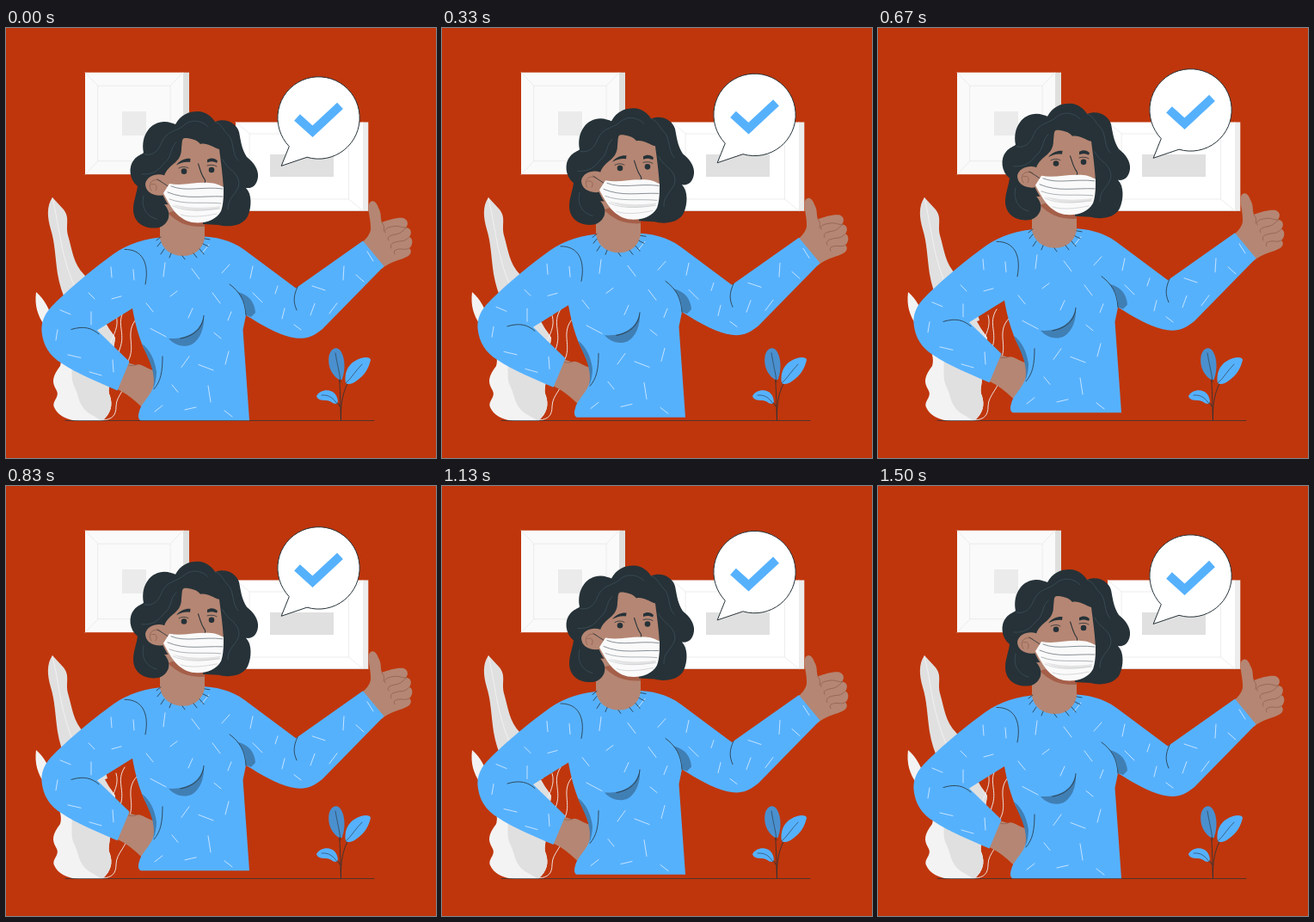
An HTML page with a canvas for the animation above (1540 ms loop, 500 px wide and 500 px high).

```html
<!DOCTYPE html>
<html lang="en">
<head>
<meta charset="utf-8">
<title>Thumbs up</title>
<style>
  html, body { margin: 0; width: 100%; height: 100%; overflow: hidden; background: #bf360c; }
  canvas { display: block; }
</style>
</head>
<body>
<canvas id="stage" width="500" height="500"></canvas>
<script>
const ctx = document.getElementById('stage').getContext('2d');
const LOOP = 1540, STEPS = 37, LIFT = 9.3, PEAK = 730;
const INK = '#263238', BLUE = '#56b1fd', SHADE = '#407fb4';
const SKIN = '#b58673', SKIN_LINE = '#8a5c4b';

const fill = (color, d) => {
  ctx.fillStyle = color;
  ctx.fill(new Path2D(d));
};
const line = (color, d, width = 1) => {
  ctx.strokeStyle = color;
  ctx.lineWidth = width;
  ctx.stroke(new Path2D(d));
};
const rect = (color, x, y, w, h) => {
  ctx.fillStyle = color;
  ctx.fillRect(x, y, w, h);
};
const dot = (color, x, y, r) => {
  ctx.fillStyle = color;
  ctx.beginPath();
  ctx.arc(x, y, r, 0, Math.PI * 2);
  ctx.fill();
};

function pictureFrame(x, y, w, h, insetX, insetY, face, side, depth) {
  rect(side, x + w, y, depth, h);
  rect(face, x, y, w, h);
  const l = x + insetX, t = y + insetY, r = x + w - insetX, b = y + h - insetY;
  line('#e6e6e6', `M${l} ${t}H${r}V${b}H${l}Z M${x} ${y}L${l} ${t}M${x + w} ${y}L${r} ${t}
    M${x} ${y + h}L${l} ${b}M${x + w} ${y + h}L${r} ${b}`, 0.7);
}

function drawRoom() {
  rect('#bf360c', 0, 0, 500, 500);
  pictureFrame(92, 51.7, 114, 118.5, 15, 15.5, '#fafafa', '#dfdfdd', 7);
  rect('#ebebeb', 135, 97, 28, 28);
  pictureFrame(267, 109.5, 148, 103, 16.5, 13.5, '#ffffff', '#ededed', 6.3);
  rect('#e0e0e0', 307, 147, 74, 26);
  line('#dcdcdc', 'M267 212.5H421', 0.8);
}

function drawPaleLeaves() {
  fill('#e0e0e0', `M54 197C47 207 48 220 52 234C57 250 57 266 60 286C64 310 74 330 90 350
    L118 340C112 318 103 300 91 287C78 274 77 258 72 241C69 228 75 220 66 210Z`);
  line('#f5f5f5', 'M54 198C60 222 63 250 69 270C74 290 82 307 94 326', 0.8);
  fill('#f3f3f3', `M35 307C33 323 37 334 44 345C53 361 68 378 63 393C54 405 53 411 58 420
    C64 429 53 433 56 441C60 450 70 456 84 457H112C123 447 124 438 121 428
    C117 420 123 412 120 402L127 360C120 348 112 340 102 346L70 360C52 350 56 325 35 307Z`);
  fill('#e0e0e0', `M76 382C78 398 74 407 80 418C85 428 84 440 98 449L112 457
    C123 447 124 438 121 428C117 420 123 412 120 402L127 362L112 336L92 336Z`);
  line('#f3f3f3', `M128 334C132 347 125 356 121 368M138 327C127 344 140 354 132 374
    C128 386 134 396 129 408M152 338C137 354 152 370 142 387M141 404C143 418 128 426 128 440
    C128 450 124 455 113 456`, 0.9);
}

function drawSprout() {
  line(INK, 'M389.5 456C389 438 391 423 400 408M389.5 456C388 432 390 412 384 386M388 440C386 434 380 430 371 429', 0.8);
  fill('#4a90cf', 'M381 373C374 376 373 392 380 402C384 408 390 411 391 408C395 397 394 384 390 377C388 373 384 371 381 373Z');
  fill(BLUE, 'M395 413C393 402 397 392 406 387C414 382 424 382 424 386C422 395 417 404 408 410C403 414 398 415 395 413Z');
  fill(BLUE, 'M361 428C365 420 378 419 383 426C386 430 387 437 384 437C379 437 378 433 372 433C366 433 362 432 361 428Z');
  line(INK, 'M383 378C385 391 388 400 389 412M395 413C402 407 406 399 414 391M367 427C376 426 381 431 385 437', 0.6);
}

function drawHands() {
  fill(SKIN, `M138 388L151 392C157 389 164 397 174 399L178 423L158 441
    C149 432 139 424 127 419Z`);
  line(SKIN_LINE, 'M151 392C147 393 145 393 142 392', 0.7);
  fill(SKIN, `M411 252C419 245 425 239 424 231C424 220 419 208 423 203C427 199 431 203 433 209
    C437 216 435 220 437 226C445 223 455 220 462 221C468 223 468 229 465 232
    C472 233 472 239 469 243C474 245 473 253 469 256C473 260 470 265 464 267
    C455 271 446 272 437 280Z`);
  line(SKIN_LINE, `M437 226C440 230 440 232 439 236M441 238C439 234 443 232 449 231
    C457 229 461 233 465 232M445 247C442 243 447 241 453 240C460 239 463 234 466 232
    M448 256C445 251 451 249 458 248C464 248 467 245 469 243M452 263C449 258 455 257 460 257
    C465 258 468 257 469 256`, 0.7);
}

function drawSweater() {
  fill(BLUE, `M179 243.5C154 246 136 254 118 268C95 285 69 307 52 325C43 335 41 344 41.5 353
    C43 369 51 382 65 390C83 402 108 412 129.5 421.5L143.5 388L106 351.5L147 326
    C150 343 154 358 160 372C168 386 174 398 173 409C172 426 157 435 155 446
    C153 451 154 456 157 456.3H283L275.5 351L279 334C297 345 315 356 331 359.5
    C346 363 356 360 368 350L439.5 277L415 247.5L337 302.5L284 263
    C267 249 251 244 231 242.5Z`);
  fill(SHADE, 'M158 367C167 374 173 385 175 400C175 408 173 415 171 420C175 401 166 386 160 372Z');
  fill(SHADE, 'M189 361C211 362 226 353 230 334.5C231 350 225 363 216 368C207 372 196 369 189 361Z');
  fill(SHADE, 'M269 307C282 310 289 318 290 331L285 336L279 334C280 324 276 314 269 307Z');
  line(INK, `M138 257.5C158 257 167 273 162 298M76 350.5C91 346 100 349 108 356
    M339 301C334 312 334 319 338 328M182 382C182 400 180 411 172 420
    M230 334.5C229 348 220 358 203 361M260 298C272 307 278 317 279 334`, 0.8);
  line('#eaf5ff', `M122 278L123 290M148 281L149 293M96 308L103 315M123 315L134 312M63 328L75 333
    M99 330V345M60 351L58 363M72 380L87 383.5M97 400L111 404M124 386L125 400M185 273L183 289
    M216 280L225 292M260 275L251 285M287 277L284 291M163 320L171 330M191 312L199 306
    M217 326L212 337M240 308L249 320M168 349.5L186 359M262 330L258 340M242 354.5L250 361
    M259 376L255 391M213 382L204 394.5M224 391.5L241 398M193 415L200 423.5M173 446L182 439
    M208 444L221 441M235 416L238 435M254 445L263 452M287 308L298 319M316 300L313 309
    M324 326L321 338M335 345L343 351M359 320.5L354 334M385 320L376 332M356 300L371 305
    M393 277L392 293M407 287L416 295M420 260L427 271M236 252L228 262`, 0.75);
}

function drawNeck() {
  fill(SKIN, 'M179 205H231V245C228 257 220 265 206 265C191 265 182 257 179 245Z');
  fill('#a55f49', 'M188 215C199 226 211 232 231 231V221L205 210Z');
  line(INK, `M180 243L175 247M180 249L176 254M184 257L180 263M192 262L190 267
    M205 265L208 269M218 262L222 267M225 257L230 263M229 251L235 254M231 245L237 246`, 0.8);
}

function drawHead() {
  fill(INK, `M184 205C194 216 189 228 178 232C161 235 148 226 148 211C148 201 152 193 153 184
    C143 176 142 161 149 153C153 148 158 147 160 145C156 124 169 109 184 109C190 109 194 111 197 112
    C203 101 212 97 223 97C233 97 240 104 243 109C256 104 268 111 271 121
    C273 131 274 141 280 150C288 156 294 165 293 173C292 182 287 187 279 186
    C286 193 286 208 281 219C275 231 257 232 247 229L229 228L231 207Z`);
  fill(SKIN, `M184 172C189 157 204 158 204 140C205 133 204 128 208 128C215 128 222 130 226 135
    C233 133 241 139 248 141C250 157 252 170 253 188C253 210 245 223 223 226
    C202 224 189 210 182 193Z`);
  fill(SKIN, 'M189 174C181 167 164 170 162 181C162 191 172 197 186 194Z');
  line(SKIN_LINE, 'M180 178C170 173 164 182 169 189M169 182C174 180 177 184 174 189', 0.7);
  line('#465a64', `M161 147C170 149 177 144 181 133C187 119 198 121 207 113C216 105 229 108 235 115
    M158 170C171 171 178 165 184 157C193 151 190 140 198 133
    M243 109C252 112 252 119 258 124C266 132 262 146 270 154
    M252 153C258 166 270 166 271 181C270 193 257 197 258 211
    M160 195C157 207 162 219 175 222`, 0.6);

  dot(INK, 207, 166.7, 3.3);
  dot(INK, 239, 165, 3.3);
  fill(INK, 'M198 159.5C203 153 209 151.5 214.5 152L214 156C208 155 203 157 198 159.5Z');
  fill(INK, 'M234 153C238 150.5 243 151 246 154.5L245 157C241 155 238 155 234 156.5Z');
  line(INK, 'M201 163C205 161 209 161 212 163M234 160C238 159 242 159 245 161', 0.8);
  line(INK, 'M223.5 158C226 165 227 171 231 176C233 180 231 181 228 181', 1.1);

  line(INK, 'M176 176L189 184.5', 0.8);
  fill('#fafafa', `M190 181C206 184 218 179 236 180C243 180 249 183 253 185
    C253 195 253 205 250 213C244 224 230 228 216 226C198 222 190 205 183 192Z`);
  fill('#e3e3e3', 'M194 205C207 208 222 211 250 207L247 210C228 214 208 213 194 205Z');
  line('#56626a', 'M192 184C209 191 228 184 252 187M188 191C209 200 228 195 252 196', 0.7);
  line('#8d969a', 'M190 199C208 206 228 202 250 204', 0.7);
  line('#c4c8ca', 'M194 207C211 215 231 212 249 210M203 217C214 221 231 219 245 216', 0.7);
}

function drawBubble() {
  const bubble = 'M329 137.5A47.7 47.7 0 1 1 350 150.3L320.5 160.3Z';
  fill('#ffffff', bubble);
  line(INK, bubble, 1);
  ctx.lineCap = 'butt';
  ctx.lineJoin = 'miter';
  line(BLUE, 'M338.5 104L356.5 120.3L388.5 90.5', 10);
}

function render(now) {
  const time = Math.floor((now % LOOP) / LOOP * STEPS) * LOOP / STEPS;
  const rise = LIFT * (1 + Math.cos((time - PEAK) / LOOP * Math.PI * 2)) / 2;
  ctx.lineCap = 'round';
  ctx.lineJoin = 'round';
  drawRoom();
  drawPaleLeaves();
  drawSprout();
  line(INK, 'M69 456.5H428', 0.7);
  ctx.save();
  ctx.translate(0, -rise);
  drawHands();
  drawSweater();
  drawNeck();
  drawHead();
  drawBubble();
  ctx.restore();
}

const start = performance.now();
function tick() {
  render(performance.now() - start);
  requestAnimationFrame(tick);
}
tick();
</script>
</body>
</html>
```
